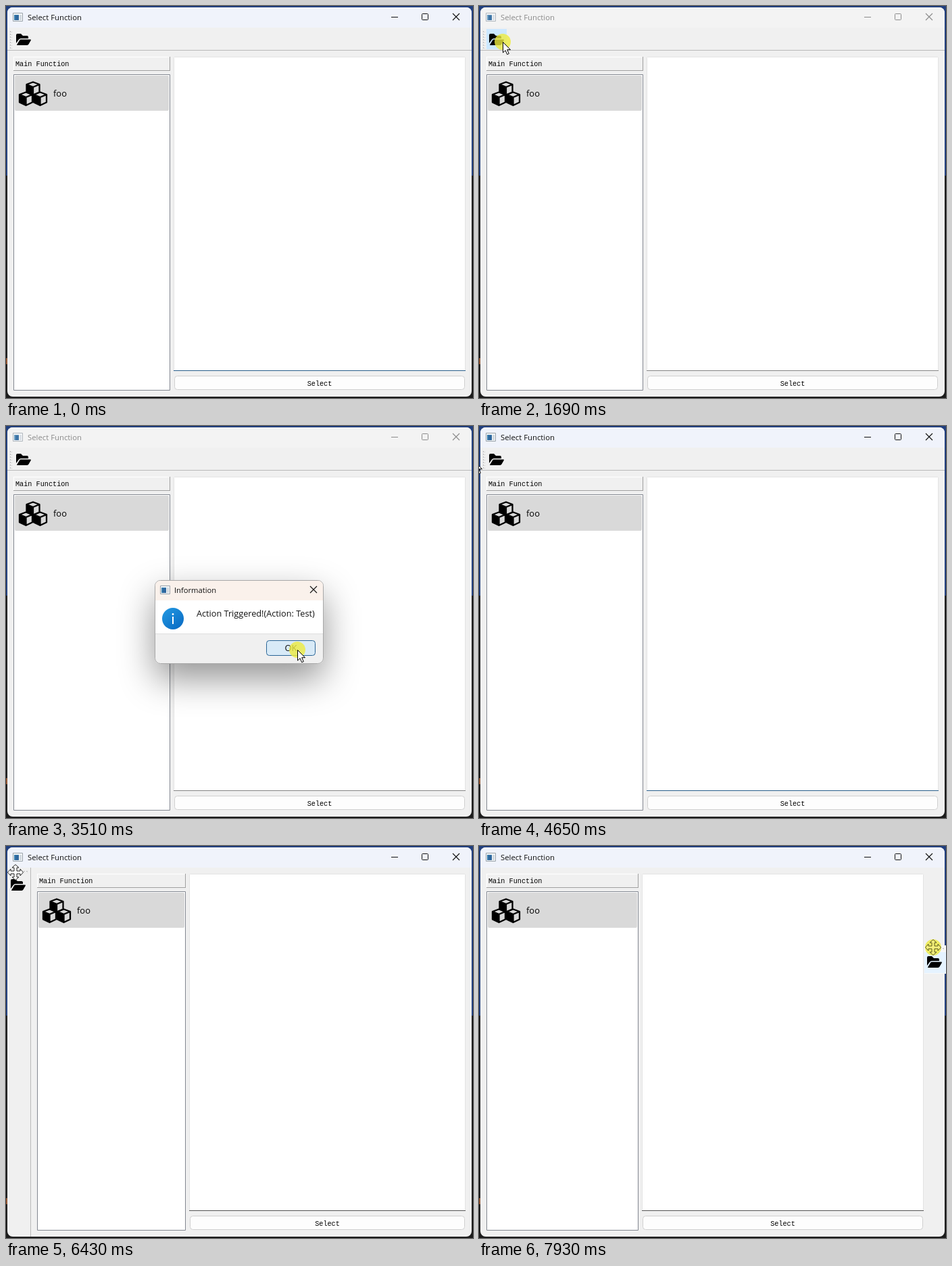
Animation, 691 px wide and 580 px high, one loop 8000 ms. Source, as an HTML page with a canvas:

```html
<!DOCTYPE html>
<html lang="en">
<head>
<meta charset="utf-8">
<title>Select Function</title>
<style>
html, body { margin: 0; width: 100%; height: 100%; overflow: hidden; background: #1c1c1c; }
canvas { display: block; }
</style>
</head>
<body>
<canvas id="stage" width="691" height="580"></canvas>
<script>
const ctx = document.getElementById('stage').getContext('2d');
const LOOP = 8000;
const SANS = '"Open Sans", sans-serif', MONO = '"Liberation Mono", monospace';

// Pointer track: time, x, y
const TRACK = [
  [0, 450, 600], [70, 450, 600], [820, 92, 192], [1020, 88, 186], [1490, 35, 53],
  [2690, 35, 53], [3200, 452, 340], [3380, 431, 331], [3800, 431, 331], [4250, -25, 50],
  [4580, -25, 50], [4650, -7, 52], [4930, 8, 59], [5140, 8, 59], [5530, 30, 46],
  [5750, 30, 46], [6400, 14, 40], [6500, 16, 37], [6770, 16, 37], [7250, 290, 27],
  [7390, 290, 27], [7860, 672, 150], [LOOP, 672, 150]
];
const PRESSES = [[1690, 1820], [3400, 3650], [5140, 5900], [6570, LOOP]];

const within = (t, a, b) => t >= a && t < b;
const lerp = (a, b, p) => a + (b - a) * p;
const ramp = (t, a, b) => {
  const p = Math.min(1, Math.max(0, (t - a) / (b - a)));
  return p * p * (3 - 2 * p);
};

function pointerAt(t) {
  const i = TRACK.findIndex(k => k[0] > t);
  const [t0, x0, y0] = TRACK[i - 1], [t1, x1, y1] = TRACK[i];
  const p = ramp(t, t0, t1);
  return { x: Math.round(lerp(x0, x1, p)), y: Math.round(lerp(y0, y1, p)) };
}

function rect(x, y, w, h, fill, r = 0, stroke) {
  ctx.beginPath();
  if (stroke) ctx.roundRect(x + .5, y + .5, w - 1, h - 1, r);
  else ctx.roundRect(x, y, w, h, r);
  ctx.fillStyle = fill;
  ctx.fill();
  if (stroke) { ctx.strokeStyle = stroke; ctx.lineWidth = 1; ctx.stroke(); }
}

function text(str, x, y, size, font, color = '#000', align = 'left') {
  ctx.font = `${size}px ${font}`;
  ctx.fillStyle = color;
  ctx.textAlign = align;
  ctx.fillText(str, x, y);
}

function shape(x, y, d, fill, stroke, width = 1) {
  const path = new Path2D(d);
  ctx.save();
  ctx.translate(x, y);
  if (fill) { ctx.fillStyle = fill; ctx.fill(path); }
  if (stroke) {
    ctx.strokeStyle = stroke;
    ctx.lineWidth = width;
    ctx.lineJoin = 'round';
    ctx.stroke(path);
  }
  ctx.restore();
}

function disc(x, y, r, fill) {
  ctx.beginPath();
  ctx.arc(x, y, r, 0, 7);
  ctx.fillStyle = fill;
  ctx.fill();
}

const closeMark = (x, y, color) => shape(x, y, 'M0 0L10 10M10 0L0 10', null, color, 1.1);

function windowIcon(x, y, alpha) {
  ctx.save();
  ctx.globalAlpha *= alpha;
  rect(x, y, 15, 13, '#f4f6f8', 0, '#9aa3ab');
  rect(x + 2, y + 3, 7, 8, '#3b7fae');
  rect(x + 4, y + 4, 5, 7, '#2f679e');
  rect(x + 10, y + 3, 3, 8, '#d3dae0');
  ctx.restore();
}

function folder(x, y) {
  shape(x, y, 'M0 14V2Q0 0 2 0H7L10 3H16Q18 3 18 5V7H7Q5 7 4 8.6ZM1 16.5L5.2 9.4Q5.7 8.4 7 8.4H21Q22.5 8.4 21.8 9.8L18.5 15.6Q17.8 17 16.2 17H1.5Z', '#000');
}

function cube(x, y) {
  shape(x, y, 'M0-9.5L9.5-6V5.5L0 10L-9.5 5.5V-6ZM-9.5-6L0-2L9.5-6M0-2V10', null, '#000', 2.3);
  shape(x, y, 'M-9.5-6L0-2V10L-9.5 5.5Z', '#000');
}

function frame(active) {
  rect(0, 0, 691, 580, '#1c1c1c');
  rect(0, 0, 691, 251, '#213f7d');
  rect(0, 521, 2, 9, '#8f5330');
  rect(2, 2, 687, 576, '#f0f0f0', 8);
  ctx.beginPath();
  ctx.roundRect(2, 2, 687, 30, [8, 8, 0, 0]);
  ctx.fillStyle = active ? '#f0f3fb' : '#f3f3f3';
  ctx.fill();
  const ink = active ? '#111' : '#8b8b8b';
  windowIcon(10, 10, active ? 1 : .75);
  text('Select Function', 32, 21, 11.35, SANS, ink);
  rect(570, 16, 10, 1, ink);
  shape(615.5, 11.5, 'M1 0H8Q9 0 9 1V8Q9 9 8 9H1Q0 9 0 8V1Q0 0 1 0Z', null, ink);
  closeMark(661, 11, ink);
}

function content(left, top, right, active, rowHot, focusLine) {
  const listW = Math.round((right - left) * .3472);
  const edit = left + listW + 6, editW = right - edit;

  rect(left, top, listW, 21, '#f0f0f0');
  rect(left, top, listW, 1, '#fff');
  rect(left, top, 1, 21, '#fff');
  rect(left, top + 20, listW, 1, '#a0a0a0');
  rect(left + listW - 1, top, 1, 21, '#a0a0a0');
  text('Main Function', left + 3, top + 14, 10.2, MONO);

  rect(left, top + 26, listW, 468 + 75 - top, '#fff', 0, '#828790');
  rect(left + 2, top + 28, listW - 4, 52, rowHot ? '#cce8ff' : '#d9d9d9', 2);
  cube(left + 29, top + 47);
  cube(left + 18.5, top + 62);
  cube(left + 39.5, top + 62);
  text('foo', left + 59, top + 59, 12.9, SANS);

  rect(edit - 1, top, editW + 1, 465 + 75 - top, '#fff', 1, '#e3e3e3');
  rect(edit - 1, 539, editW + 1, 1, active ? focusLine : '#868686');
  rect(edit, 547, editW - 1, 21, '#fdfdfd', 4, '#d0d0d0');
  text('Select', edit + editW / 2 - .5, 562, 10.2, MONO, '#000', 'center');
}

function horizontalBar(buttonFill) {
  rect(2, 65, 687, 1, '#b9b9b9');
  for (let y = 37; y < 62; y += 4) {
    rect(6, y, 1, 2, '#b4b4b4');
    rect(8, y + 1, 1, 1, '#c8c8c8');
  }
  if (buttonFill) rect(11, 34, 30, 30, buttonFill);
  folder(15, 41);
}

function verticalBar(x, y, floating) {
  if (floating) {
    rect(x, y, 32, 42, '#f8f8f8');
    rect(x, y + 10, 32, 31, '#e5f3ff');
  }
  for (let dx = 3; dx < 30; dx += 4) {
    rect(x + dx, y + 4, 2, 1, '#b4b4b4');
    rect(x + dx + 1, y + 6, 1, 1, '#d4d4d4');
  }
  folder(x + 4, y + 16);
}

function dialog(scale, alpha, hot) {
  ctx.save();
  ctx.globalAlpha = alpha;
  ctx.translate(282, 265);
  ctx.scale(scale, scale);
  ctx.translate(-282, -265);
  ctx.shadowColor = 'rgba(0,0,0,.42)';
  ctx.shadowBlur = 52;
  ctx.shadowOffsetY = 22;
  rect(220, 228, 250, 124, '#f0f0f0', 8);
  ctx.shadowColor = 'transparent';
  rect(220, 228, 250, 124, '#f0f0f0', 8, '#a8a8a8');
  ctx.beginPath();
  ctx.roundRect(221, 229, 248, 29, [7, 7, 0, 0]);
  ctx.fillStyle = '#faf1eb';
  ctx.fill();
  rect(221, 258, 248, 49, '#fff');
  rect(221, 307, 248, 1, '#dfdfdf');
  windowIcon(228, 236, 1);
  text('Information', 249, 247, 11.2, SANS, '#111');
  closeMark(450, 237, '#111');
  const blue = ctx.createLinearGradient(235, 270, 259, 300);
  blue.addColorStop(0, '#2196e0');
  blue.addColorStop(1, '#0a6cc4');
  disc(247, 285, 16, blue);
  disc(247, 278.5, 1.4, '#fff');
  rect(246, 282, 2, 11, '#fff');
  text('Action Triggered!(Action: Test)', 282, 282, 12.7, SANS, '#111');
  rect(385, 317, 73, 23, hot ? '#d8eaf7' : '#fdfdfd', 4, '#2a6596');
  text('OK', 421.5, 333, 12.9, SANS, '#111', 'center');
  ctx.restore();
}

function pointer({ x, y }, cross, pressed) {
  if (pressed) disc(x, y, 12, 'rgba(238,235,62,.8)');
  if (!cross) {
    shape(x + .5, y + .5, 'M0 0V15.5L3.6 12.2L6.2 18.2L8.8 17L6.2 11.2H11Z', '#fff', '#000');
    return;
  }
  const arm = [[-2, -2], [-2, -7], [-5, -7], [0, -11.5], [5, -7], [2, -7]];
  const points = [];
  for (let i = 0; i < 4; i++)
    for (const [a, b] of arm) points.push([[a, b], [-b, a], [-a, -b], [b, -a]][i]);
  shape(x, y, 'M' + points.join('L') + 'Z', pressed ? '#f4f07c' : '#fff', pressed ? '#5c5a20' : '#222');
}

function draw(t) {
  const at = pointerAt(t);
  const active = t < 70 || within(t, 2090, 2330) || t >= 3760;
  const pressed = PRESSES.some(([a, b]) => within(t, a, b));
  const cross = t >= 4780;
  const dialogOpen = within(t, 2330, 3900);
  const over = (x, y, w, h) => !cross && within(at.x, x, x + w) && within(at.y, y, y + h);

  const left = 11 + Math.round(35 * (ramp(t, 5280, 5500) - ramp(t, 6800, 7000)));
  const top = 75 - Math.round(34 * ramp(t, 5210, 5340));
  const right = 680 - Math.round(35 * ramp(t, 7810, 8015));

  frame(active);
  content(left, top, right, active, !dialogOpen && over(13, 103, 228, 52), t < 5210 ? '#2a5f8c' : '#555');

  if (t < 5210) {
    const hot = !dialogOpen && over(11, 34, 30, 30);
    horizontalBar(hot && (pressed ? '#cce8ff' : '#e5f3ff'));
  } else if (within(t, 5900, 6790)) {
    rect(36, 32, 1, 546, '#b9b9b9');
    verticalBar(3, 33, false);
  } else {
    verticalBar(at.x - 13, at.y - 3, true);
  }

  if (dialogOpen) {
    const p = Math.min(1, (t - 2330) / 260);
    const opened = 1 - (1 - p) * (1 - p), closing = ramp(t, 3720, 3900);
    dialog(.82 + .18 * opened - .08 * closing, Math.min(1, opened * 1.1) * (1 - closing), over(385, 317, 73, 23));
  }
  pointer(at, cross, pressed);
}

function tick() {
  draw(performance.now() % LOOP);
  requestAnimationFrame(tick);
}
tick();
</script>
</body>
</html>
```
